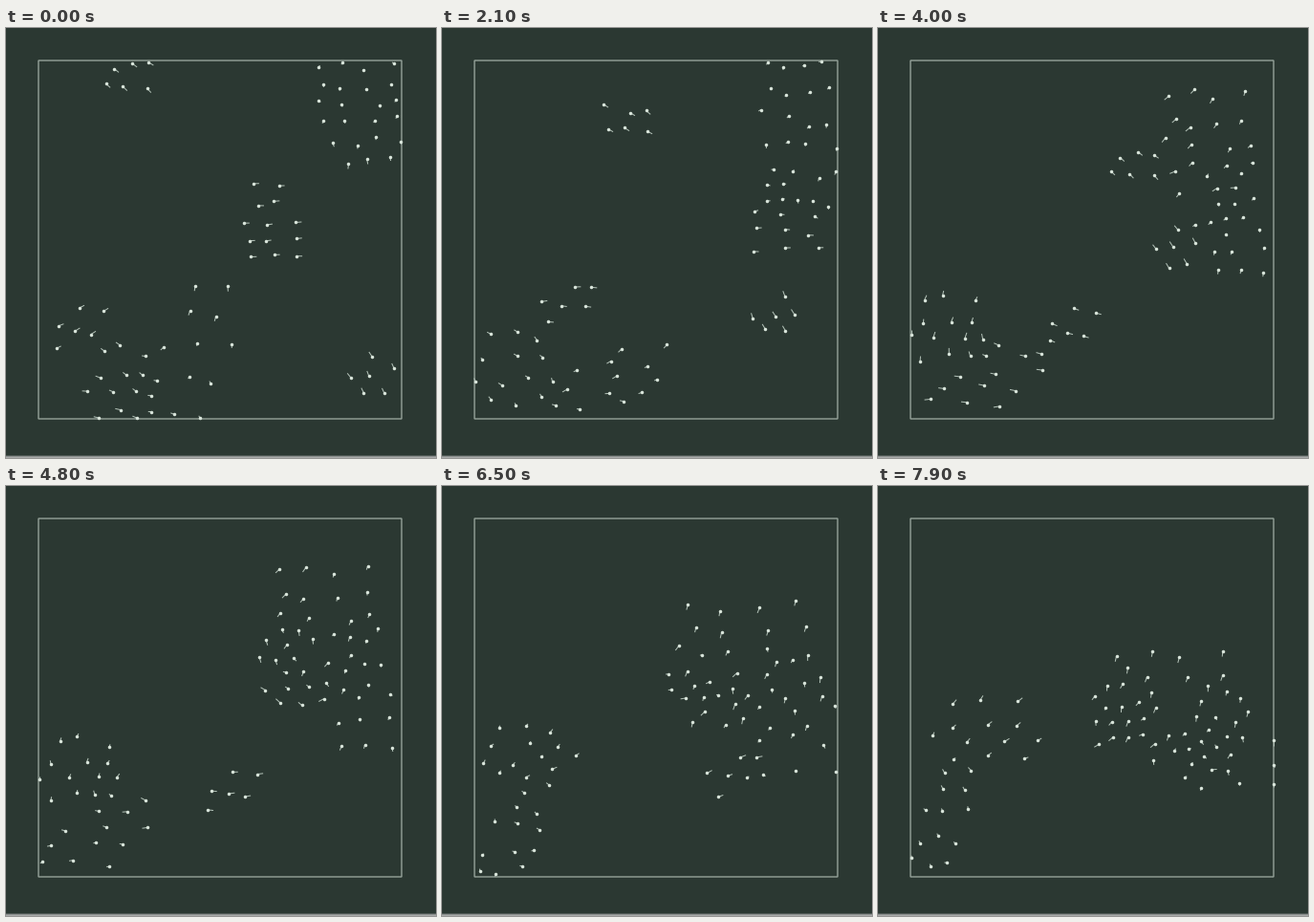
A matplotlib script that plays this animation: 450x450 px, repeating every 8 s.

```python
import matplotlib.pyplot as plt
import numpy as np
from matplotlib.animation import FuncAnimation
from matplotlib.collections import LineCollection
from matplotlib.patches import Rectangle

SIZE, FRAMES, INTERVAL = 450, 80, 100
LEFT, TOP, RIGHT, BOTTOM = 34, 34, 414, 409
BACKGROUND, BORDER = "#2b3832", "#95a39a"
BODY, BEAK = "#d9e5db", "#b3c2b8"
PX = 0.72  # points per pixel at 100 dpi

KEY_FRAMES = np.array([0, 21, 48, 65, 79])
SPACING = 17  # birds closer than this push each other away
rng = np.random.default_rng(4)


def glide(keys):
    """Smooth cubic motion through the key values, one row per frame."""
    keys = np.asarray(keys, float)
    slopes = np.gradient(keys, KEY_FRAMES, axis=0)
    frames = np.arange(FRAMES)
    k = np.clip(np.searchsorted(KEY_FRAMES, frames, "right") - 1,
                0, len(KEY_FRAMES) - 2)
    span = np.diff(KEY_FRAMES)[k][:, None]
    u = (frames - KEY_FRAMES[k])[:, None] / span
    ease = u * u * (3 - 2 * u)
    return (keys[k] + ease * (keys[k + 1] - keys[k])
            + span * u * (1 - u) * ((1 - u) * slopes[k] - u * slopes[k + 1]))


def formation(rows, lean):
    """Loose rows of birds, scaled to fit -0.5 to 0.5 both ways."""
    slots = np.array([(c - (n - 1) / 2 + lean * r, r)
                      for r, n in enumerate(rows) for c in range(n)], float)
    slots -= (slots.max(axis=0) + slots.min(axis=0)) / 2
    slots += rng.normal(0, 0.13, slots.shape)
    return slots / np.ptp(slots, axis=0)


def flock(rows, lean, centres, sizes):
    """Goals of every bird of one flock, as (frame, bird, xy)."""
    centre = glide(centres)
    size = glide(np.broadcast_to(sizes, (len(KEY_FRAMES), 2)))
    return centre[:, None] + size[:, None] * formation(rows, lean)


goals = np.concatenate([
    # three small flocks that keep their shape
    flock((3, 3), -0.1,
          [(131, 49), (193, 94), (291, 168), (293, 236), (260, 262)], (42, 24)),
    flock((1, 3, 2), -0.1,
          [(384, 362), (353, 298), (297, 208), (264, 190), (252, 223)], (42, 37)),
    flock((2, 3, 1), -0.7,
          [(74, 319), (131, 289), (234, 325), (304, 302), (338, 284)], (48, 42)),
    # upper right
    flock((2, 2, 3, 3, 3), 0.1,
          [(279, 203), (358, 194), (376, 214), (369, 234), (372, 268)],
          [(58, 74), (64, 72), (62, 120), (78, 130), (92, 100)]),
    flock((4, 4, 4, 4, 4, 3), 0.1,
          [(371, 87), (373, 110), (338, 148), (322, 188), (312, 228)],
          [(88, 106), (78, 152), (105, 135), (148, 128), (138, 110)]),
    # lower left
    flock((2, 2, 3, 3, 3), -0.4,
          [(190, 334), (168, 364), (90, 358), (70, 357), (64, 342)],
          [(84, 142), (118, 60), (106, 72), (70, 88), (62, 104)]),
    flock((3, 3, 4, 3), 0,
          [(122, 372), (76, 357), (78, 298), (88, 280), (114, 256)],
          [(66, 72), (90, 78), (86, 62), (98, 52), (112, 66)]),
], axis=1)

# Every bird also wanders a little by itself.
phase = rng.uniform(0, 2 * np.pi, goals.shape[1:])
goals += 4 * np.sin(2 * np.pi * np.arange(FRAMES)[:, None, None] / 45 + phase)


def spread(pos, passes=5):
    """Push crowded birds apart and keep all of them inside the box."""
    for _ in range(passes):
        gap = pos[:, None] - pos
        dist = np.maximum(np.hypot(gap[..., 0], gap[..., 1]), 1e-3)
        push = np.maximum(SPACING - dist, 0) / dist
        pos = pos + 0.25 * (gap * push[..., None]).sum(axis=1)
        pos = np.clip(pos, (LEFT + 1, TOP + 1), (RIGHT, BOTTOM - 1))
    return pos


def fly():
    """Follow the goals, carrying part of each push over to the next frame."""
    track, shift = [], spread(goals[0], 40) - goals[0]
    for goal in goals:
        pos = spread(goal + 0.9 * shift)
        shift = pos - goal
        track.append(pos)
    return np.array(track)


birds = fly()
velocity = np.gradient(birds, axis=0)
speed = np.maximum(np.linalg.norm(velocity, axis=2, keepdims=True), 1e-6)
beak_tips = birds + velocity / speed * np.clip(2 * speed, 2.5, 6)

fig = plt.figure(figsize=(SIZE / 100, SIZE / 100), dpi=100, facecolor=BACKGROUND)
ax = fig.add_axes((0, 0, 1, 1))
ax.set(xlim=(0, SIZE), ylim=(SIZE, 0))
ax.axis("off")

ax.add_patch(Rectangle((LEFT, TOP), RIGHT - LEFT, BOTTOM - TOP,
                       fill=False, ec=BORDER, lw=1.4 * PX, snap=False))
for row, shade in enumerate(("#4f5955", "#8d918f", "#a8aaa9")):
    ax.add_patch(Rectangle((0, SIZE - 3 + row), SIZE, 1, fc=shade, lw=0))

beaks = ax.add_collection(LineCollection([], colors=BEAK, linewidths=PX, zorder=3))
bodies, = ax.plot([], [], "o", color=BODY, ms=3.5 * PX, mew=0, zorder=4)


def update(frame):
    bodies.set_data(*birds[frame].T)
    beaks.set_segments(np.stack([birds[frame], beak_tips[frame]], axis=1))
    return beaks, bodies


anim = FuncAnimation(fig, update, frames=FRAMES, interval=INTERVAL,
                     repeat=True, repeat_delay=0)
plt.show()
```
